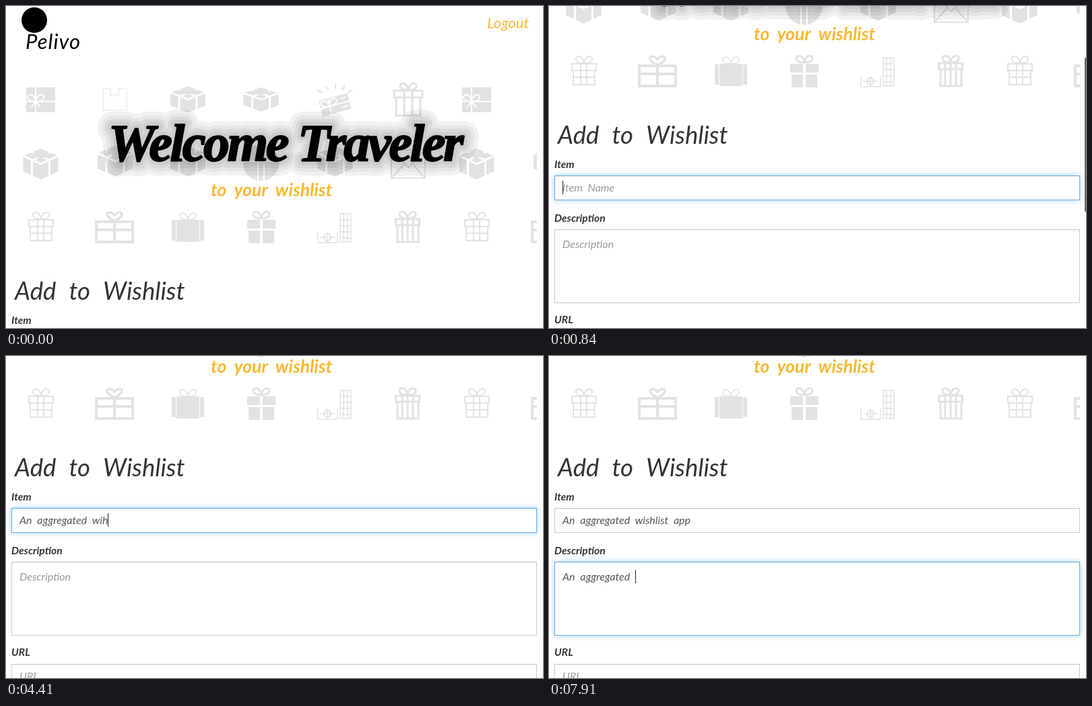
Recreate the animation shown at these times as an HTML page. Size 797 by 479 pixels, loop 8 s.

```html
<!DOCTYPE html>
<html lang="en">
<head>
<meta charset="utf-8">
<title>Wishlist</title>
<style>
@property --scroll { syntax: "<number>"; inherits: true; initial-value: 0; }
html, body { margin: 0; width: 100%; height: 100%; overflow: hidden; background: #fff; }
body { position: relative; font: italic 400 16px/20px Lato, "Open Sans", sans-serif; color: #333; animation: scroll 8s step-end infinite; }
#page { position: absolute; left: 0; top: 0; width: 797px; height: 800px; transform: translateY(calc(var(--scroll) * -1px)); }
#banner { position: absolute; left: 0; top: 0; }
#thumb {
  position: absolute; left: 795px; top: 0; width: 7px; height: 231px; border-radius: 3.5px; background: #666;
  transform: translateY(calc(var(--scroll) * .43px - 24px)); animation: thumb 8s step-end infinite;
}
label { position: absolute; left: 8px; font-weight: 700; font-size: 15.6px; }
.field {
  position: absolute; left: 8px; width: 780px; height: 37px; box-sizing: border-box; padding: 7px 11px;
  border: 1px solid #ccc; box-shadow: inset 0 1px 1px #00000013, 0 0 8px #66afe900;
  background: #fff; color: #555; white-space: pre; word-spacing: 4px;
}
.area { height: 110px; padding-top: 11px; }
.caret { position: absolute; width: 1px; height: 20px; background: #222; visibility: hidden; }
.hint { color: #999; }
.typed:not(:empty) ~ .hint { display: none; }
#item { animation: blur 8s linear infinite; }
#desc { animation: focus 8s linear infinite; }

@keyframes scroll {
  0% { --scroll: 0; }
  5.25% { --scroll: 8; }
  6.125% { --scroll: 34; }
  7% { --scroll: 70; }
  7.875% { --scroll: 120; }
  8.75% { --scroll: 170; }
  9.625% { --scroll: 207; }
  10.5% { --scroll: 232; }
  11.375% { --scroll: 247; }
  12.25% { --scroll: 255; }
  14%, 100% { --scroll: 258; }
}
@keyframes thumb {
  0% { opacity: 0; }
  5.25% { opacity: 1; }
  20.125% { opacity: .8; }
  21% { opacity: .4; }
  21.875%, 100% { opacity: 0; }
}
@keyframes blur {
  0%, 78% { border-color: #66afe9; box-shadow: inset 0 1px 1px #00000013, 0 0 8px #66afe999; }
  80.5%, 100% { border-color: #ccc; box-shadow: inset 0 1px 1px #00000013, 0 0 8px #66afe900; }
}
@keyframes focus {
  0%, 78% { border-color: #ccc; box-shadow: inset 0 1px 1px #00000013, 0 0 8px #66afe900; }
  80.5%, 100% { border-color: #66afe9; box-shadow: inset 0 1px 1px #00000013, 0 0 8px #66afe999; }
}
</style>
</head>
<body>
<div id="page">
  <svg id="banner" width="797" height="460" fill="none">
    <defs>
      <path id="bow" d="M0 0C-16 0-14-11-7-10-3-9 0-4 0 0 0-4 3-9 7-10 14-11 16 0 0 0z"/>
      <g id="cube">
        <path fill="#e2e2e2" d="M0-23 26-12V11L0 23-26 11V-12z"/>
        <path stroke="#fff" stroke-width="3" d="M-26-12-13-6V18M26-12 13-6V18M-13-6 0 0 13-6M-14-18 14-5M14-18-14-5"/>
        <path fill="#e2e2e2" d="M0-9c-14 0-14-11-5-9l5 4 5-4c9-2 9 9-5 9z"/>
      </g>
      <g id="tile" stroke="#e2e2e2" stroke-width="2">
        <!-- top row -->
        <path fill="#e2e2e2" stroke="none" d="M30 121h43v37H30z"/>
        <path stroke="#fff" d="M44 121v37M30 142h43M44 142l-7 9M44 142l7 9"/>
        <use href="#bow" x="44" y="142" fill="#e2e2e2" stroke="#fff"/>
        <path stroke="#ececec" stroke-width="1.5" d="M155 123h-11v32h35v-32h-12v11l-6-3-6 3z"/>
        <use href="#cube" transform="translate(270 139) scale(1 .85)" stroke="none"/>
        <use href="#cube" transform="translate(378.5 139) scale(1 .78)" stroke="none"/>
        <g transform="rotate(-15 488 146)">
          <path fill="#e2e2e2" stroke="none" d="M466 135h44v24h-44z"/>
          <path stroke="#fff" d="M480 135v24M466 147h44M498 140h8M498 153h8"/>
          <use href="#bow" x="480" y="147" stroke="#fff" fill="#e2e2e2"/>
        </g>
        <path d="M462 125l8 4M474 118l5 7M489 116v7M503 118l-4 7M514 125l-7 4"/>
        <path stroke-width="3" d="M576 126h42v10h-42zM579 136v27h36v-27M591 126v37M603 126v37"/>
        <use href="#bow" x="597" y="125" stroke-width="3"/>
        <!-- middle row -->
        <g stroke="none">
          <use href="#cube" x="51.5" y="235"/>
          <use href="#cube" x="162" y="231"/>
          <use href="#cube" x="270" y="231"/>
          <use href="#cube" x="488.5" y="231"/>
          <circle cx="378.5" cy="233" r="27" fill="#e2e2e2"/>
        </g>
        <path stroke="#fff" d="M374 233v28M383 233v28M352 231h53"/>
        <path d="M572 214h50v42h-50zl25 26 25-26M572 256l18-20M622 256l-18-20"/>
        <!-- bottom row -->
        <path d="M34 318h36v10H34zM36 328v21h32v-21M47 318v31M56 318v31M36 338h32"/>
        <use href="#bow" x="52" y="317"/>
        <path stroke-width="4" d="M134 321h54v12h-54zM134 333v18h54v-18M161 321v30"/>
        <path stroke-width="3.5" d="M161 320c-14-7-13-13-7-13 4 0 7 4 7 6 0-2 3-6 7-6 6 0 7 6-7 13z"/>
        <path fill="#e2e2e2" stroke="none" d="M246 319h6v30h-6zM253 318h34v33h-34zM288 319h6v30h-6z"/>
        <use href="#bow" x="270" y="318" stroke-width="1.5"/>
        <path fill="#e2e2e2" stroke="none" d="M358 318h19v13h-19zM381 318h19v13h-19zM360 334h17v19h-17zM381 334h17v19h-17z"/>
        <use href="#bow" x="379" y="316" stroke-width="3"/>
        <path stroke-width="1.5" d="M463 336v16h29v-16M466 344h22M477 336v16M496 309h16v42h-16zM501 309v42M507 309v42M496 318h16M496 327h16M496 336h16M496 345h16"/>
        <circle cx="477" cy="344" r="5"/>
        <path stroke-width="3" d="M578.5 317h35v9h-35zM581 326v25h31v-25M588 317v34M596 317v34M604 317v34"/>
        <use href="#bow" x="596" y="316" stroke-width="3"/>
      </g>
      <clipPath id="frame"><path d="M0 90h788v280H0z"/></clipPath>
      <text id="title" x="152" y="230" font-family="'Liberation Serif', serif" font-size="78" font-weight="700" letter-spacing="-3.4">Welcome Traveler</text>
    </defs>

    <g clip-path="url(#frame)">
      <use href="#tile"/>
      <use href="#tile" x="647"/>
    </g>

    <g stroke="#000" stroke-linejoin="round">
      <use href="#title" stroke-width="44" opacity=".05"/>
      <use href="#title" stroke-width="32" opacity=".04"/>
      <use href="#title" stroke-width="22" opacity=".05"/>
      <use href="#title" stroke-width="12" opacity=".05"/>
      <use href="#title" stroke-width="2" fill="#000"/>
    </g>

    <circle cx="42" cy="21" r="19" fill="#000"/>
    <text x="29" y="64" font-size="31" letter-spacing="1" fill="#000">Pelivo</text>
    <g fill="#fbb833">
      <text x="714" y="33" font-size="22">Logout</text>
      <text x="304" y="283" font-size="26.5" font-weight="700" word-spacing="6">to your wishlist</text>
    </g>
    <text x="13" y="437" font-size="36.5" word-spacing="11" fill="#333">Add to Wishlist</text>
  </svg>

  <label style="top:457px">Item</label>
  <div class="field" id="item" style="top:484px"><span class="typed"></span><i class="caret"></i><span class="hint">Item Name</span></div>
  <label style="top:537px">Description</label>
  <div class="field area" id="desc" style="top:564px"><span class="typed"></span><i class="caret"></i><span class="hint">Description</span></div>
  <label style="top:688px">URL</label>
  <div class="field" style="top:716px"><span class="hint">URL</span></div>
</div>
<div id="thumb"></div>

<script>
const LOOP = 8000, TICK = 70;

// Spreads keystrokes over a span of time, snapped to ticks; "<" is backspace.
function burst(start, end, keys) {
  const gap = (end - start) / Math.max(1, keys.length - 1);
  return [...keys].map((key, i) => ({ key, at: start + Math.ceil(i * gap / TICK - 1e-6) * TICK }));
}

function makeField(id, caretFrom, caretTo, keys) {
  const box = document.getElementById(id);
  return { typed: box.querySelector(".typed"), caret: box.querySelector(".caret"), caretFrom, caretTo, keys };
}

const fields = [
  makeField("item", 0, 6160, [
    ...burst(1680, 1680, "A"),
    ...burst(2170, 3150, "n aggregate"),
    ...burst(3290, 3570, "d wi"),
    ...burst(4060, 4130, "hs"),
    ...burst(4410, 5110, "<<shlist "),
    ...burst(5390, 5600, "app"),
  ]),
  makeField("desc", 6300, LOOP, [
    ...burst(6510, 7070, "An agg"),
    ...burst(7210, 7910, "regated "),
  ]),
];

function textAt(keys, t) {
  return keys.filter(k => k.at <= t)
    .reduce((text, { key }) => key === "<" ? text.slice(0, -1) : text + key, "");
}

function render(t) {
  for (const { typed, caret, caretFrom, caretTo, keys } of fields) {
    const text = textAt(keys, t);
    if (typed.textContent !== text) typed.textContent = text;
    caret.style.visibility = t >= caretFrom && t < caretTo ? "visible" : "hidden";
  }
}

const start = performance.now();
function tick() {
  render((performance.now() - start) % LOOP);
  requestAnimationFrame(tick);
}
tick();
</script>
</body>
</html>
```
